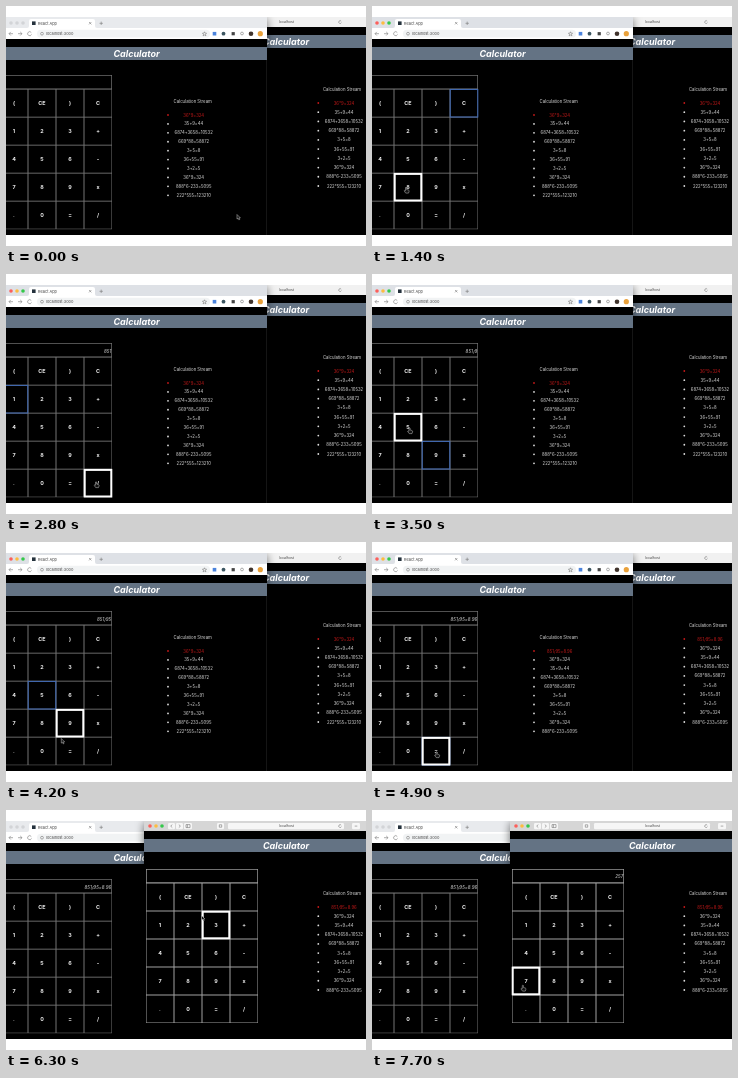
Write an HTML page that moves like this. It is 360x240 px and loops after 8 s.

```html
<!DOCTYPE html>
<html lang="en">
<head>
<meta charset="utf-8">
<title>Calculator</title>
<style>
  html, body { margin: 0; width: 100%; height: 100%; overflow: hidden; background: #fff; }
  svg { display: block; width: 360px; height: 240px; font-family: Inter, "Liberation Sans", sans-serif;
        font-feature-settings: "calt" 0; }
  #desk { clip-path: inset(11px 0); }
  .page { fill: #000; filter: drop-shadow(0 2px 4px rgba(0, 0, 0, .55)); }
  .strip { fill: #dee1e6; }
  .idle .strip { fill: #e8eaed; }
  .idle .light { fill: #d2d4d7; }
  .bar { fill: #d6d6d6; }
  .idle .bar { fill: #f1f1f1; }
  .idle .tool { display: none; }
  .icon { fill: none; stroke: #777; stroke-width: .6; }
  .first { fill: #c41818; }
</style>
</head>
<body>
<svg viewBox="0 0 360 240">
  <defs><clipPath id="screen"><rect y="11" width="360" height="218"/></clipPath></defs>
  <g id="stage" clip-path="url(#screen)"></g>
</svg>
<script>
const stage = document.getElementById('stage');
const KEYS = ['(', 'CE', ')', 'C', '1', '2', '3', '+', '4', '5', '6', '-',
              '7', '8', '9', 'x', '.', '0', '=', '/'];
const CELL = 28;
const SUM = '851/95=8.96';
const HISTORY = ['36*9=324', '35+9=44', '6874+3658=10532', '669*88=58872', '3+5=8',
                 '36+55=91', '3+2=5', '36*9=324', '888*6-233=5095', '222*555=123210'];

function add(parent, tag, attrs = {}, label) {
  const el = document.createElementNS('http://www.w3.org/2000/svg', tag);
  for (const k in attrs) el.setAttribute(k, attrs[k]);
  if (label !== undefined) el.textContent = label;
  parent.append(el);
  return el;
}
const rect = (p, x, y, width, height, attrs) => add(p, 'rect', { x, y, width, height, ...attrs });
const dot = (p, cx, cy, r, fill, attrs) => add(p, 'circle', { cx, cy, r, fill, ...attrs });
const icon = (p, d, attrs) => add(p, 'path', { d, class: 'icon', ...attrs });

// y is the middle of the capitals
function text(p, label, x, y, size, attrs) {
  return add(p, 'text', { x, y: y + size * .36, 'font-size': size, fill: '#dcdcdc',
    'text-anchor': 'middle', ...attrs }, label);
}

function lights(p, x, y) {
  ['#fc605b', '#fdbc40', '#34c84a'].forEach((c, i) => dot(p, x + i * 6, y, 1.8, c, { class: 'light' }));
}

function header(p, x, y, width, mid) {
  rect(p, x, y, width, 13, { fill: '#647384' });
  text(p, 'Calculator', mid, y + 6.8, 9, { 'font-weight': 700, 'font-style': 'italic', fill: '#fff' });
}

function calculator(p, x, y, line) {
  // neighbouring borders join into one full line
  const box = (bx, by, w, h, width) => rect(p, bx + width / 2, by + width / 2, w - width, h - width,
    { fill: 'none', stroke: line, 'stroke-width': width });
  box(x, y - 14, CELL * 4, 14, .7);
  const display = text(p, '', x + 111.3, y - 6.3, 4.5, { 'text-anchor': 'end', 'font-style': 'italic' });
  const cell = key => {
    const i = KEYS.indexOf(key);
    return [x + i % 4 * CELL, y + (i >> 2) * CELL];
  };
  for (const key of KEYS) {
    const [cx, cy] = cell(key);
    box(cx, cy, CELL, CELL, .5);
    text(p, key, cx + 14, cy + 14, 5.4, { 'font-weight': 700, fill: '#f0f0f0' });
  }
  const ring = (stroke, width) => {
    const el = rect(p, 0, 0, CELL - width + .6, CELL - width + .6,
      { fill: 'none', stroke, 'stroke-width': width });
    return key => {
      el.style.display = key ? '' : 'none';
      if (!key) return;
      const [cx, cy] = cell(key), inset = width / 2 - .3;
      el.setAttribute('x', cx + inset);
      el.setAttribute('y', cy + inset);
    };
  };
  const focus = ring('#406bb8', 1), hover = ring('#fff', 2);
  return (value, focusKey, hoverKey) => {
    display.textContent = value;
    focus(focusKey);
    hover(hoverKey);
  };
}

function stream(p, x, y, pitch, titleX) {
  text(p, 'Calculation Stream', titleX, y - 13.6, 4.3);
  const rows = HISTORY.map((_, i) => {
    const cls = i ? {} : { class: 'first' };
    dot(p, x - 25.7, y + i * pitch, .9, '#dcdcdc', cls);
    return text(p, '', x, y + i * pitch, 4.25, cls);
  });
  return list => rows.forEach((row, i) => row.textContent = list[i]);
}

function makeChrome() {
  const g = add(stage, 'g');
  rect(g, 0, 11, 261, 218, { class: 'page' });
  rect(g, 260.5, 54, .5, 175, { fill: '#2a2a2a' });
  rect(g, 0, 11, 261, 11, { class: 'strip' });
  lights(g, 5, 17);
  add(g, 'path', { d: 'M21 22 Q23 22 23 20 V15 Q23 13 25 13 H87 Q89 13 89 15 V20 Q89 22 91 22Z', fill: '#fff' });
  rect(g, 26, 15.4, 3.6, 3.6, { fill: '#25323d' });
  const dark = { fill: '#444', 'text-anchor': 'start' };
  text(g, 'React App', 32, 17.4, 3.9, dark);
  icon(g, 'M83 16 l2.4 2.4 m0 -2.4 l-2.4 2.4 M93.5 17.3 h3.4 m-1.7 -1.7 v3.4');
  rect(g, 0, 22, 261, 11, { fill: '#fff' });
  icon(g, 'M7 27.7 H3 l1.8 -1.8 M3 27.7 l1.8 1.8 M12 27.7 h4 l-1.8 -1.8 M16 27.7 l-1.8 1.8 M25.3 26.6 a2 2 0 1 0 .2 1.8');
  rect(g, 31, 23.8, 173, 7.8, { rx: 3.9, fill: '#f1f3f4' });
  dot(g, 36, 27.7, 1.4, 'none', { class: 'icon' });
  text(g, 'localhost:3000', 40, 27.6, 3.9, dark);
  icon(g, 'M198.5 25.8 l.6 1.4 1.5 .1 -1.1 1 .4 1.5 -1.4 -.8 -1.4 .8 .4 -1.5 -1.1 -1 1.5 -.1Z', { 'stroke-width': .5 });
  rect(g, 206.7, 25.9, 3.6, 3.6, { fill: '#4b83dc' });
  dot(g, 217.5, 27.7, 1.9, '#3b5560');
  rect(g, 225.6, 26.1, 3.2, 3.2, { fill: '#444' });
  dot(g, 236, 27.5, 1.4, 'none', { class: 'icon' });
  dot(g, 245, 27.7, 2.3, '#40332c');
  dot(g, 254.3, 27.7, 2.6, '#e9a13b');
  header(g, 0, 41, 261, 130.5);
  return { g, calc: calculator(g, -6, 83.2, '#747474'), list: stream(g, 187.7, 109, 8.92, 186.7) };
}

function makeSafari() {
  const g = add(stage, 'g');
  rect(g, 138, 11, 222, 218, { class: 'page' });
  rect(g, 138, 11, 222, 10, { class: 'bar' });
  lights(g, 144, 16);
  const tools = add(g, 'g', { class: 'tool' });
  for (const [x, w] of [[162, 7], [170, 7], [178, 8], [211, 7], [222, 116], [346, 8]])
    rect(tools, x, 13, w, 6.2, { rx: 1.2, fill: '#f6f6f6' });
  icon(tools, 'M166.3 14.6 l-1.6 1.5 1.6 1.5 M172.8 14.6 l1.6 1.5 -1.6 1.5 M180 14.6 h4 v3 h-4Z m1.4 0 v3 M213.3 14.8 h2.4 v2.4 h-2.4Z M348.7 16.1 h2.6', { 'stroke-width': .5 });
  text(g, 'localhost', 280.5, 16, 3.5, { fill: '#444' });
  icon(g, 'M335.2 15.2 a1.4 1.4 0 1 0 .2 1.4', { 'stroke-width': .5 });
  header(g, 138, 29, 222, 280);
  return { g, calc: calculator(g, 140, 73, '#a2a2a2'), list: stream(g, 338, 97, 9.22, 336) };
}

const chrome = makeChrome(), safari = makeSafari();
const pointer = add(stage, 'path', { fill: '#111', stroke: '#c4c4c4', 'stroke-width': .5 });
const ARROW = 'M0 0 V4.6 L1.1 3.7 L1.9 5.4 L2.7 5 L2 3.4 H3.4Z';
const HAND = 'M0 0 Q.6 -.6 1.1 0 V2 L3 2.5 Q3.8 2.8 3.6 3.8 L3 5.6 H.2 L-1.4 3.3 Q-1.2 2.5 0 3.2Z';

// pointer x, y, shape; display; focused key; hovered key
const STEP = 700, LOOP = 8000;
const WAKE = 2, SOLVED = 7, SWAP = 9;
const STEPS = [
  [231, 208.5, ARROW, '', '', ''],
  [91, 98, HAND, '', '', 'C'],
  [33.5, 181.5, HAND, '', 'C', '8'],
  [8, 126, HAND, '85', '5', '1'],
  [89.5, 208, HAND, '851', '1', '/'],
  [37, 154, HAND, '851/9', '9', '5'],
  [55.3, 196.5, ARROW, '851/95', '5', '9'],
  [64, 210, HAND, SUM, '=', '='],
  [257.8, 75, ARROW, SUM, '=', ''],
  [195.5, 105.5, ARROW, '', '', '3'],
  [183, 134, HAND, '2', '', '2'],
  [150.3, 175.5, HAND, '257', '', '7']
];

let shown = -1;
function show(n) {
  const [x, y, shape, value, focus, hover] = STEPS[n];
  const swapped = n >= SWAP;
  const [front, back] = swapped ? [safari, chrome] : [chrome, safari];
  front.g.setAttribute('class', n < WAKE ? 'idle' : '');
  back.g.setAttribute('class', 'idle');
  stage.append(back.g, front.g, pointer);
  front.calc(value, focus, hover);
  back.calc(swapped ? SUM : '', '', '');
  const list = n >= SOLVED ? [SUM, ...HISTORY] : HISTORY;
  chrome.list(list);
  safari.list(list);
  pointer.setAttribute('d', shape);
  pointer.setAttribute('transform', `translate(${x} ${y})`);
}

function tick() {
  const n = Math.floor(performance.now() % LOOP / STEP);
  if (n !== shown) show(shown = n);
  requestAnimationFrame(tick);
}
tick();
</script>
</body>
</html>
```
